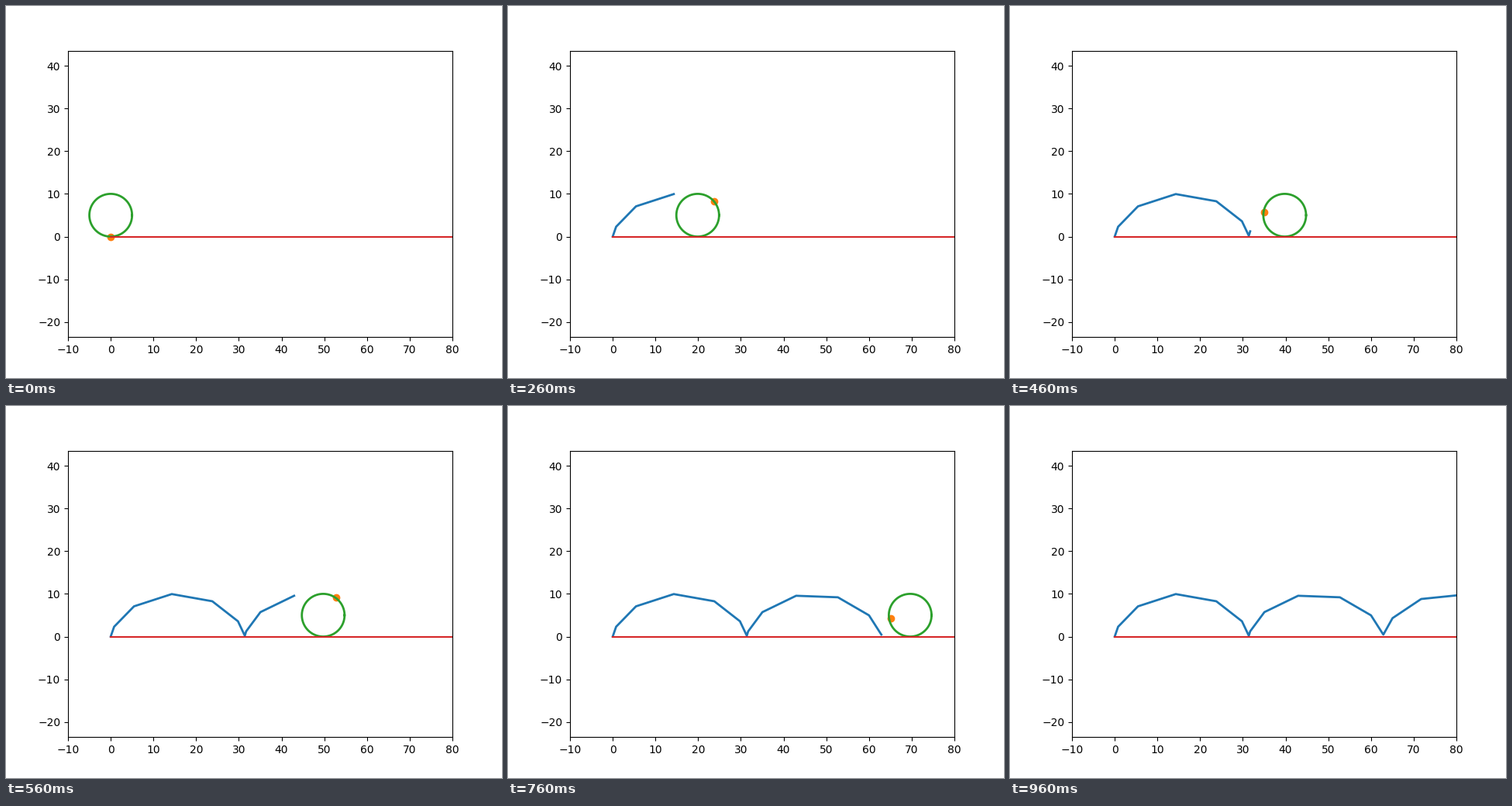
Recreate the animation shown at these times as a matplotlib script. Size 640 by 480 pixels, loop 2780 ms.

```python
import numpy as np
import matplotlib.pyplot as plt
from matplotlib.animation import FuncAnimation

RADIUS = 5
LOOP, TICK = 2780, 10        # ms
START, STEP = 110, 50        # first move, time between moves (ms)
LAST = 18
CENTER_SPEED = 4.975         # the wheel trails the traced point slightly

theta = np.arange(LAST + 1)
px = RADIUS * (theta - np.sin(theta))
py = RADIUS * (1 - np.cos(theta))
ring = np.linspace(0, 2 * np.pi, 100)

fig, ax = plt.subplots(figsize=(6.4, 4.8), dpi=100)
trace, = ax.plot([], [], lw=2)
dot, = ax.plot([], [], "o")
wheel, = ax.plot([], [], lw=2)
ax.plot([0, 100], [0, 0])

# equal scale on both axes, centred on y = 10
half = 45 * 369.6 / 496
ax.set_xlim(-10, 80)
ax.set_ylim(10 - half, 10 + half)


def update(i):
    t = i * TICK
    k = 0 if t < START else min((t - START) // STEP + 1, LAST)
    trace.set_data(px[:k], py[:k])
    dot.set_data([px[k]], [py[k]])
    wheel.set_data(CENTER_SPEED * k + RADIUS * np.cos(ring),
                   RADIUS + RADIUS * np.sin(ring))
    return trace, dot, wheel


anim = FuncAnimation(fig, update, frames=LOOP // TICK, interval=TICK,
                     repeat=True, repeat_delay=0)
plt.show()
```
